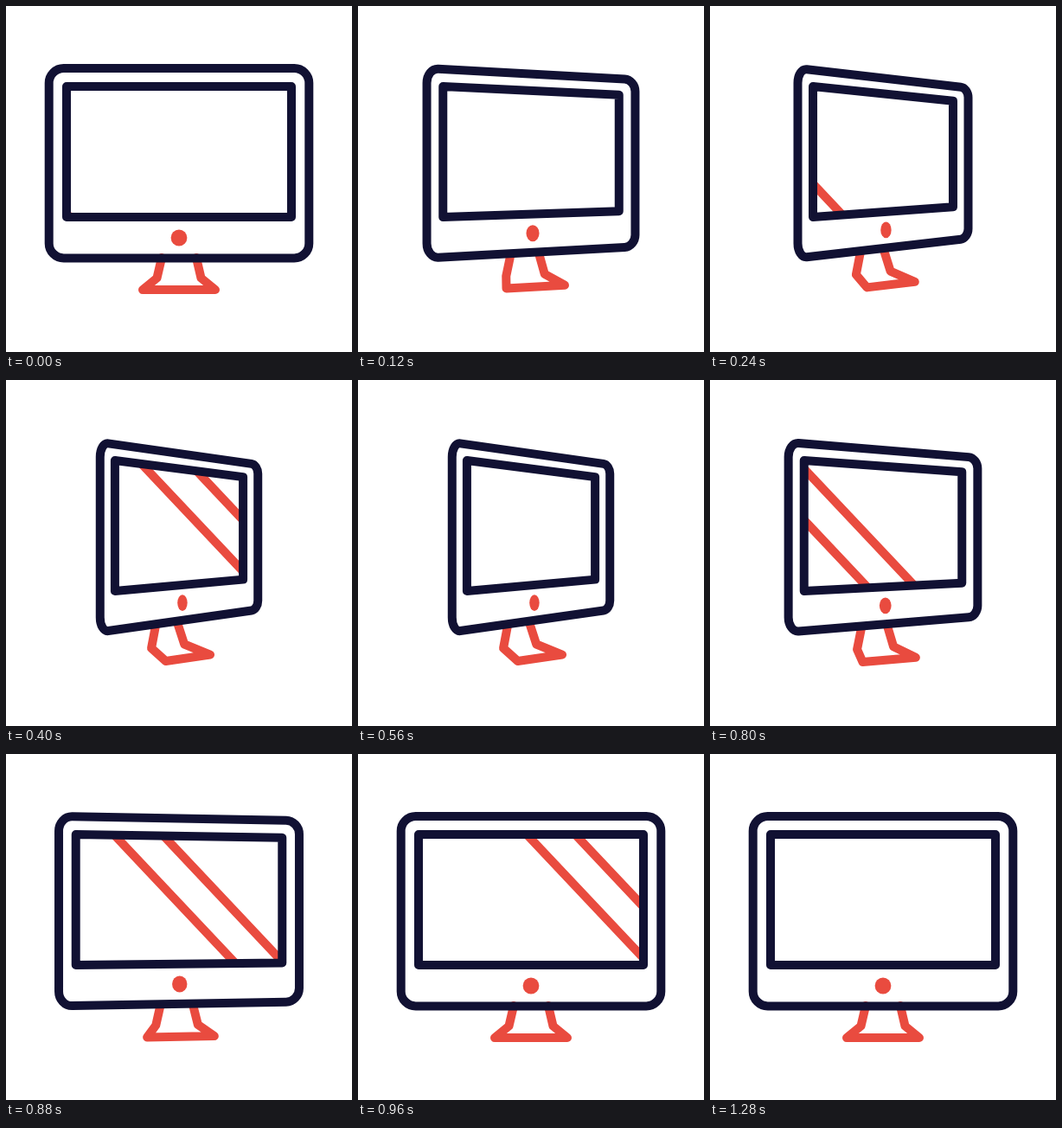
Animation of 400 by 400 pixels, one loop 1320 ms. Source, as an HTML page:

```html
<!DOCTYPE html>
<html lang="en">
<head>
<meta charset="utf-8">
<title>Turning monitor</title>
<style>
  html, body { margin: 0; width: 100%; height: 100%; overflow: hidden; background: #fff; }
  svg { display: block; width: 100%; height: 100%; }
</style>
</head>
<body>
<svg viewBox="0 0 400 400" fill="none" stroke-width="10" stroke-linecap="round" stroke-linejoin="round">
  <clipPath id="clip"><path id="clipShape"/></clipPath>
  <path id="stand" stroke="#e94b3f"/>
  <path id="glare" stroke="#e94b3f" clip-path="url(#clip)"/>
  <path id="body" stroke="#111133"/>
  <path id="screen" stroke="#111133"/>
  <ellipse id="dot" fill="#e94b3f"/>
</svg>
<script>
const LOOP = 1320, STEP = 40, TURN = 480, CENTER = 200, GAP = 56;
const set = (id, attrs) => {
  for (const k in attrs) document.getElementById(id).setAttribute(k, attrs[k]);
};
const clamp = v => Math.min(1, Math.max(0, v));

// Cubic bezier easing (1/3, 0, x2, 1), solved by bisection
function ease(x, x2) {
  let lo = 0, hi = 1;
  for (let i = 0; i < 24; i++) {
    const s = (lo + hi) / 2;
    if (s * (1 - s) ** 2 + 3 * x2 * s * s * (1 - s) + s ** 3 < x) lo = s; else hi = s;
  }
  return hi * hi * (3 - 2 * hi);
}

// Outline whose left edge keeps its height while the right edge shrinks by the drops
function panel(half, top, bottom, dropTop, dropBottom, radius, p) {
  const left = CENTER - half, right = CENTER + half;
  const y = (x, edge, drop) => edge + drop * (x - left) / (2 * half);
  const corner = (x, edge, drop, side, rise) => {
    const rx = radius * (1 - (side > 0 ? .57 : .45) * p);
    const ry = radius * (1 - (side > 0 ? .4 : 0) * p);
    const inner = x - side * rx;
    const flat = k => [x - side * rx * k, y(x - side * rx * k, edge, drop)];
    const upright = k => [x, y(x, edge, drop) + rise * ry * k];
    return { inner, flat, upright };
  };
  const turn = (c, a, b) => `${c[a](1)}C${c[a](.45)} ${c[b](.45)} ${c[b](1)}`;
  const topDrop = dropTop * p, bottomDrop = -dropBottom * p;
  return "M" + [
    turn(corner(left, top, topDrop, -1, 1), "upright", "flat"),
    turn(corner(right, top, topDrop, 1, 1), "flat", "upright"),
    turn(corner(right, bottom, bottomDrop, 1, -1), "upright", "flat"),
    turn(corner(left, bottom, bottomDrop, -1, -1), "flat", "upright")
  ].join("L") + "Z";
}

// Mirrored pairs of points that shift, squeeze and tilt with the turn
function stand(p) {
  const pair = (half, y, shift, squeeze) => [-1, 1].map(side =>
    [CENTER + shift * p + side * (half - squeeze * p), y - p * (6.8 + side * half * .09)]);
  const [neckL, neckR] = pair(20, 291, -14.5, 7);
  const [elbowL, elbowR] = pair(25.5, 314.5, -13, 6.5);
  const [footL, footR] = pair(42, 328, 10.5, 16.5);
  return "M" + [neckL, elbowL, footL, footR, elbowR, neckR].join("L");
}

// Two parallel stripes sweeping from lower left to upper right
function stripes(t, start, end) {
  const x = -62 + 456 * ease(clamp((t - start) / (end - start)), .42);
  return [x, x - GAP].map(v => `M${v - 56.6} 40L${v + 188.6} 300`).join("");
}

function draw(t) {
  const p = ease(clamp(1 - Math.abs(t - TURN) / TURN), 0);
  const screen = panel(130 - 56.5 * p, 93, 244, 19.3, 13.5, 0, p);
  set("screen", { d: screen });
  set("clipShape", { d: screen });
  set("body", { d: panel(150.3 - 59.7 * p, 72, 291.4, 26.2, 26.2, 17, p) });
  set("stand", { d: stand(p) });
  set("glare", { d: stripes(t, 86, 755) + stripes(t, 516, 1356) });
  set("dot", { cx: CENTER + 4 * p, cy: 268 - 10.5 * p, rx: 9.4 - 3.7 * p, ry: 9.4 });
}

function tick() {
  draw(Math.floor(performance.now() % LOOP / STEP) * STEP);
  requestAnimationFrame(tick);
}
tick();
</script>
</body>
</html>
```
